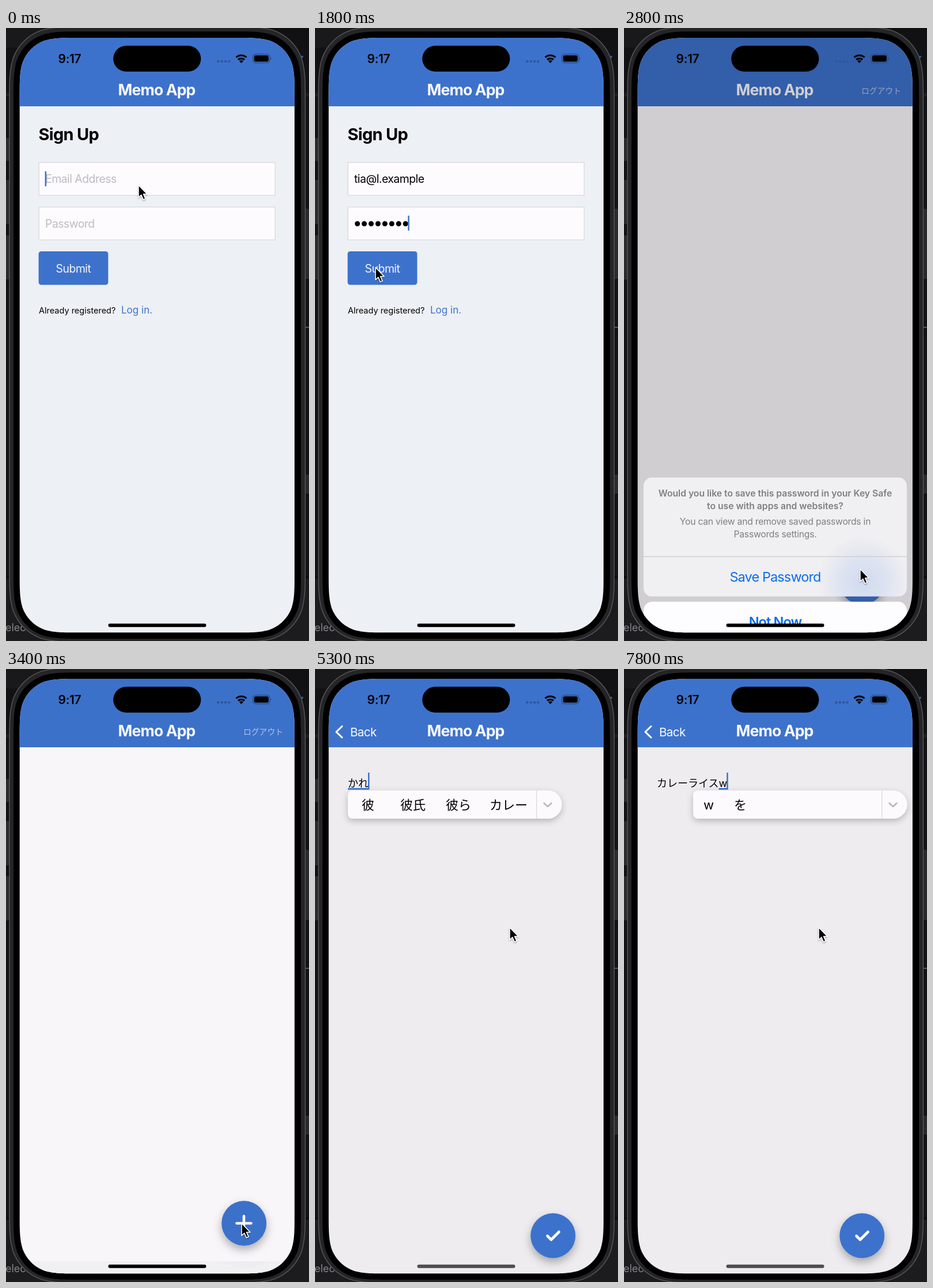
Animation, 526 px wide and 1065 px high, one loop 8000 ms. Source, as an HTML page:

```html
<!DOCTYPE html>
<html lang="ja">
<head>
<meta charset="utf-8">
<title>Memo</title>
<style>
  html, body { margin: 0; width: 100%; height: 100%; overflow: hidden; background: #121114; }
  svg { display: block; }
  text { font-family: Inter, 'Noto Sans CJK JP', 'Noto Sans CJK', sans-serif; white-space: pre; }
  .field { font-size: 19.4px; letter-spacing: -.026em; }
  .hint { fill: #bdbcc0; }
  .mid { text-anchor: middle; }
  .note { font-size: 15.7px; letter-spacing: -.015em; fill: #7f7e81; text-anchor: middle; }
  .action { font-size: 23.5px; letter-spacing: -.038em; fill: #0a6cf0; text-anchor: middle; }
  .cand { font-size: 22px; }
  .bold { font-weight: 600; }
  .note.bold { letter-spacing: 0; }
  .line { fill: none; stroke-linecap: round; stroke-linejoin: round; }
</style>
</head>
<body>
<svg id="stage" width="526" height="1065" viewBox="0 0 526 1065">
  <defs>
    <clipPath id="screenClip"><path id="screenShape"/></clipPath>
    <filter id="soft" x="-40%" y="-40%" width="180%" height="190%">
      <feDropShadow dx="0" dy="7" stdDeviation="7.5" flood-opacity=".3"/>
    </filter>
    <filter id="popShadow" x="-10%" y="-30%" width="120%" height="190%">
      <feDropShadow dx="0" dy="4" stdDeviation="6" flood-opacity=".24"/>
    </filter>
    <filter id="tiny" x="-30%" y="-30%" width="170%" height="170%">
      <feDropShadow dx="0" dy="1.5" stdDeviation="1.2" flood-opacity=".35"/>
    </filter>
    <radialGradient id="glow">
      <stop offset="0" stop-color="#86acec" stop-opacity=".3"/>
      <stop offset=".5" stop-color="#8fb2f0" stop-opacity=".2"/>
      <stop offset="1" stop-color="#a0bdf0" stop-opacity="0"/>
    </radialGradient>
  </defs>

  <!-- desk behind the phone -->
  <rect width="526" height="1065" fill="#121114"/>
  <rect width="526" height="34" fill="#19181b"/>
  <rect x="405" width="121" height="34" fill="#111013"/>
  <path d="M0 116H526" stroke="#1d1c1f" stroke-width="6"/>
  <path d="M0 192H5V230H0ZM0 265H5V340H0ZM0 361H5V436H0ZM519 315H525V435H519ZM519 777H526V808H519Z" fill="#29282b" stroke="#3a393c"/>
  <rect y="950" width="526" height="115" fill="#1c1b1e"/>
  <path d="M0 954H526" stroke="#0e0d10" stroke-width="6"/>
  <path d="M519 520H526" stroke="#58575a" stroke-width="2"/>
  <path d="M512 50H516" stroke="#285fae" stroke-width="3"/>
  <text x="-1" y="1048" font-size="18" fill="#858488">elect</text>

  <!-- phone body -->
  <path id="frameShape" fill="#252527" stroke="#59595b" stroke-width="1.4"/>
  <path id="bezelShape"/>

  <g clip-path="url(#screenClip)">
    <g id="signup">
      <rect x="23" y="17" width="479" height="1034" fill="#edf0f5"/>
      <text x="56.5" y="195" font-size="29" font-weight="700" letter-spacing="-.7">Sign Up</text>
      <g fill="#fdfbfe" stroke="#d8d9dc" stroke-width="1.3">
        <rect x="57.2" y="233.6" width="410" height="57.2"/>
        <rect x="57.2" y="311" width="410" height="57.2"/>
      </g>
      <text id="emailHint" class="field hint" x="68" y="269">Email Address</text>
      <text id="email" class="field" x="68" y="269"></text>
      <text id="passHint" class="field hint" x="68" y="346.5">Password</text>
      <g id="dots"></g>
      <rect id="formCaret" width="2.5" height="26" fill="#3d72cc"/>
      <g id="submit">
        <rect x="56.6" y="388" width="120.8" height="58.3" rx="4.6" fill="#3d72cc"/>
        <text class="field mid" x="117" y="424.5" fill="#f4f5fa">Submit</text>
      </g>
      <text x="57" y="495.5" font-size="14.5">Already registered?</text>
      <text x="200" y="496" font-size="17" fill="#3d72cc">Log in.</text>
    </g>

    <g id="list">
      <rect x="23" y="17" width="479" height="1034" fill="#fbf9fc"/>
      <circle cx="413.2" cy="963" r="39" fill="#3d72cc" filter="url(#soft)"/>
      <path class="line" d="M400.5 963H425.5M413 950.5V975.5" stroke="#fff" stroke-width="4.6"/>
    </g>

    <g id="editor">
      <rect x="23" y="17" width="479" height="1034" fill="#eeecee"/>
      <text id="memo" x="57" y="205" font-size="18"></text>
      <rect id="underline" y="207" height="2.6" fill="#2f6bd3"/>
      <rect id="memoCaret" y="180" width="2.5" height="29.5" fill="#3d72cc"/>
      <circle cx="413.2" cy="984.5" r="39" fill="#3d72cc" filter="url(#soft)"/>
      <path class="line" d="M403.5 985L410 991.5L423.5 978" stroke="#fff" stroke-width="4.6"/>
      <g id="popup">
        <path d="M10 211H347A24.5 24.5 0 0 1 347 260H10Q0 260 0 250V221Q0 211 10 211Z" fill="#fcfafd" filter="url(#popShadow)"/>
        <rect id="picked" x="3" y="214" width="153" height="43" rx="8" fill="#dfe6f3"/>
        <path d="M327.7 211V260" stroke="#dcdadd" stroke-width="1.3"/>
        <path class="line" d="M340.5 233L347 239L353.5 233" stroke="#b7b5b9" stroke-width="2.4"/>
        <g id="cands"></g>
        <g id="curry">
          <ellipse cx="195" cy="239.5" rx="12.5" ry="6.2" fill="#b9b5b4"/>
          <ellipse cx="195" cy="237.5" rx="12.5" ry="6" fill="#eeeae6"/>
          <ellipse cx="199" cy="238" rx="8" ry="4.5" fill="#b4542b"/>
          <ellipse cx="191" cy="235.5" rx="6.5" ry="4.5" fill="#f8f6f3"/>
          <path class="line" d="M198 236L204 238M196 240L201 240" stroke="#e4823c" stroke-width="2"/>
        </g>
      </g>
    </g>

    <rect x="23" y="17" width="479" height="119" fill="#3d72cc"/>
    <text class="mid" x="261.5" y="116.5" font-size="26.7" font-weight="700" letter-spacing="-.95" fill="#fafafd">Memo App</text>
    <text id="logout" x="412" y="114" font-size="13.8" fill="#b4c6e9">ログアウト</text>
    <g id="back">
      <path class="line" d="M47 99.5L37 109.3L47 119" stroke="#fff" stroke-width="3"/>
      <text x="61" y="117" font-size="20.6" letter-spacing="-.6" fill="#fafafd">Back</text>
    </g>

    <rect id="dim" x="23" y="17" width="479" height="1034"/>
    <g id="sheet">
      <svg id="panel" x="34" width="457" height="207">
        <rect width="457" height="207" rx="15" fill="#f0eff1"/>
        <circle id="fabGlow" cx="382" r="80" fill="url(#glow)"/>
        <path d="M0 137.5H457" stroke="#cbcacd" stroke-width="1.2"/>
        <text class="note bold" x="228.5" y="33">Would you like to save this password in your Key Safe</text>
        <text class="note bold" x="228.5" y="55">to use with apps and websites?</text>
        <text class="note" x="228.5" y="82">You can view and remove saved passwords in</text>
        <text class="note" x="228.5" y="104">Passwords settings.</text>
        <text class="action" x="228.5" y="181">Save Password</text>
      </svg>
      <g id="cancel">
        <rect x="34" y="216" width="457" height="69" rx="15" fill="#fdfcfe"/>
        <text class="action bold" x="262.5" y="259">Not Now</text>
      </g>
    </g>

    <!-- status bar -->
    <text x="90.5" y="60.5" font-size="21" class="bold" letter-spacing="-.3">9:17</text>
    <rect x="186.2" y="30.8" width="152.2" height="45" rx="22.5"/>
    <g id="signal" fill="#2f569c"></g>
    <path d="M399.5 51A13.5 13.5 0 0 1 417.5 51M403 55A8.5 8.5 0 0 1 414 55" fill="none" stroke="#000" stroke-width="3"/>
    <path d="M405 57.5A5 5 0 0 1 412 57.5L408.5 61Z"/>
    <rect x="428.5" y="45.3" width="29.5" height="15.4" rx="5" fill="none" stroke="#274b8a" stroke-width="1.3"/>
    <rect x="430.7" y="47.5" width="25.2" height="11" rx="3"/>
    <path d="M459.5 50.5Q462 53 459.5 55.5Z" fill="#274b8a"/>
    <rect id="homeBar" x="177.5" y="1034.8" width="170" height="6" rx="3"/>
  </g>

  <g id="pointer" filter="url(#tiny)">
    <path d="M0 0V21.5L4.8 17L8.3 25L12 23.4L8.6 15.6H15Z" stroke="#fff" stroke-width="1.5" stroke-linejoin="round"/>
  </g>
</svg>
<script>
const LOOP = 8000, STEP = 100, WIDTH = 477;
const EMAIL = 'tia@l.example';
const el = {};
document.querySelectorAll('[id]').forEach(node => el[node.id] = node);

const set = (node, attrs) => {
  for (const key in attrs) node.setAttribute(key, attrs[key]);
};
const show = (node, on) => node.setAttribute('display', on ? 'inline' : 'none');
const clamp = v => Math.max(0, Math.min(1, v));
const span = (t, a, b) => clamp((t - a) / (b - a));
const easeOut = p => 1 - (1 - p) ** 3;
const easeBoth = p => (1 - Math.cos(Math.PI * p)) / 2;
const spring = (ms, rate) => {
  const x = Math.max(0, ms) / 1000 * rate;
  return 1 - (1 + x) * Math.exp(-x);
};
const circles = (n, x, gap, y, r) => Array.from({ length: n }, (_, i) =>
  `<circle cx="${x + gap * i}" cy="${y}" r="${r}"/>`).join('');

// half of a continuous-curvature corner, in units of its radius; mirrored for the rest
const half = [[1.529, 0], [1.088, 0], [.868, 0], [.631, .075], [.373, .169]];
const corner = [...half, ...half.map(([a, b]) => [b, a]).reverse()];

function smoothRect(x, y, w, h, r) {
  const bend = (cx, cy, sx, sy, points) => {
    const [first, ...rest] = points.map(([a, b]) => `${cx + sx * a * r} ${cy + sy * b * r}`);
    return `${first}C${rest.join(' ')}`;
  };
  const back = [...corner].reverse();
  return 'M' + [
    bend(x + w, y, -1, 1, corner), bend(x + w, y + h, -1, -1, back),
    bend(x, y + h, 1, -1, corner), bend(x, y, 1, 1, back)
  ].join('L') + 'Z';
}

set(el.frameShape, { d: smoothRect(6, -2, 513.5, 1068.5, 86) });
set(el.bezelShape, { d: smoothRect(13, 6, 499, 1055, 79) });
set(el.screenShape, { d: smoothRect(23.7, 17, 477.2, 1033.3, 68) });
el.signal.innerHTML = circles(4, 368.5, 6.3, 58, 2.2);
el.dots.innerHTML = circles(8, 73.6, 11.93, 340, 4.5);

// time, x, y of the pointer tip
const path = [
  [0, 230, 273], [1200, 230, 273], [1700, 105, 416], [2000, 105, 416],
  [2600, 409, 975], [2700, 409, 975], [2800, 410, 940], [3100, 409, 963],
  [5000, 409, 963], [5250, 338, 449], [LOOP, 338, 449]
];

// candidate sets: x inside the popup, text
const sets = {
  k: [[24, 'k'], [91, 'か']],
  ka: [[24, '化'], [91, '課'], [170, '下'], [246, 'か']],
  kare: [[24, '彼'], [91, '彼氏'], [170, '彼ら'], [246, 'カレー']],
  curry: [[12, 'カレー'], [130, 'かれー'], [245, 'カレー']],
  rai: [[20, 'カレーライ'], [158, 'かれい'], [245, 'カレー']],
  rice: [[12, 'カレーライス'], [245, 'カレー']],
  wo: [[18, 'w'], [71, 'を']]
};

// time, committed text, text being composed, candidate set
const typing = [
  [0, '', '', ''], [5000, '', 'k', 'k'], [5100, '', 'か', 'ka'], [5200, '', 'かr', 'ka'],
  [5300, '', 'かれ', 'kare'], [5500, '', 'かれー', 'curry'], [5800, '', 'かれーr', 'curry'],
  [5900, '', 'かれーら', 'curry'], [6100, '', 'かれーらい', 'rai'], [6200, '', 'かれーらいs', 'rai'],
  [6500, '', 'かれーらいす', 'rice'], [6700, '', 'カレーライス', 'rice'],
  [6900, 'カレーライス', '', 'rice'], [7800, 'カレーライス', 'w', 'wo']
];

const widthOf = node => node.textContent ? node.getComputedTextLength() : 0;

function drawForm(t) {
  const letters = Math.round(span(t, 0, 900) * EMAIL.length);
  const dots = Math.round(span(t, 1000, 1650) * 8);
  const onPassword = t >= 1000;
  el.email.textContent = EMAIL.slice(0, letters);
  show(el.emailHint, !letters);
  show(el.passHint, !dots);
  [...el.dots.children].forEach((dot, i) => show(dot, i < dots));
  set(el.formCaret, onPassword
    ? { x: dots ? 65.8 + dots * 11.93 : 67.6, y: 326 }
    : { x: 67.6 + widthOf(el.email), y: 249 });
  set(el.submit, { opacity: t >= 1900 && t < 2100 ? .4 : 1 });
}

function drawEditor(t) {
  const [, done, draft, name] = typing.filter(row => row[0] <= t).pop();
  el.memo.textContent = done;
  const start = 57 + widthOf(el.memo);
  el.memo.textContent = done + draft;
  const end = 57 + widthOf(el.memo);
  set(el.underline, { x: start, width: end - start });
  const blink = t < 7800 ? 1 - span(t, 7300, 7600) : 1;
  set(el.memoCaret, { x: Math.max(57, end - 1), opacity: blink });

  const fade = t < 7800 ? 1 - span(t, 6800, 7100) : 1;
  show(el.popup, name && fade > 0);
  if (!name) return;
  set(el.popup, { opacity: fade, transform: `translate(${done && draft ? 120 : 57} 0)` });
  el.cands.innerHTML = sets[name].map(([x, label]) =>
    `<text class="cand" x="${x}" y="244">${label}</text>`).join('');
  show(el.curry, name === 'rice');
  show(el.picked, name === 'rice' && t >= 6700);
}

function drawSheet(t) {
  const shown = t < 2700 ? spring(t - 2100, 12) : 1 - spring(t - 2700, 6.5);
  const visible = t > 2100 && t < 3500;
  const top = 738 + 309 * (1 - shown);
  show(el.sheet, visible);
  set(el.dim, { opacity: visible ? .2 * shown : 0 });
  set(el.panel, { y: top });
  set(el.fabGlow, { cy: 963 - top });
  set(el.cancel, { transform: `translate(0 ${top})` });
}

function drawPointer(t) {
  const i = Math.max(1, path.findIndex(point => point[0] > t));
  const [t0, x0, y0] = path[i - 1], [t1, x1, y1] = path[i];
  const p = easeBoth(span(t, t0, t1));
  set(el.pointer, { transform: `translate(${x0 + (x1 - x0) * p} ${y0 + (y1 - y0) * p})` });
}

function draw(time) {
  const t = Math.floor(time % LOOP / STEP) * STEP;
  const toList = easeOut(span(t, 1950, 2450));
  const toEditor = easeOut(span(t, 4430, 4800));
  const slide = (node, x) => set(node, { transform: `translate(${x} 0)` });
  show(el.signup, toList < 1);
  show(el.list, toList > 0 && toEditor < 1);
  show(el.editor, toEditor > 0);
  slide(el.signup, -.3 * WIDTH * toList);
  slide(el.list, WIDTH * (1 - toList) - .3 * WIDTH * toEditor);
  slide(el.editor, WIDTH * (1 - toEditor));
  set(el.logout, { opacity: toList * (1 - toEditor) });
  set(el.back, { opacity: toEditor });
  set(el.homeBar, { fill: t >= 5000 ? '#504d51' : '#000' });
  drawForm(t);
  drawEditor(t);
  drawSheet(t);
  drawPointer(t);
}

function frame() {
  draw(performance.now());
  requestAnimationFrame(frame);
}
frame();
</script>
</body>
</html>
```
